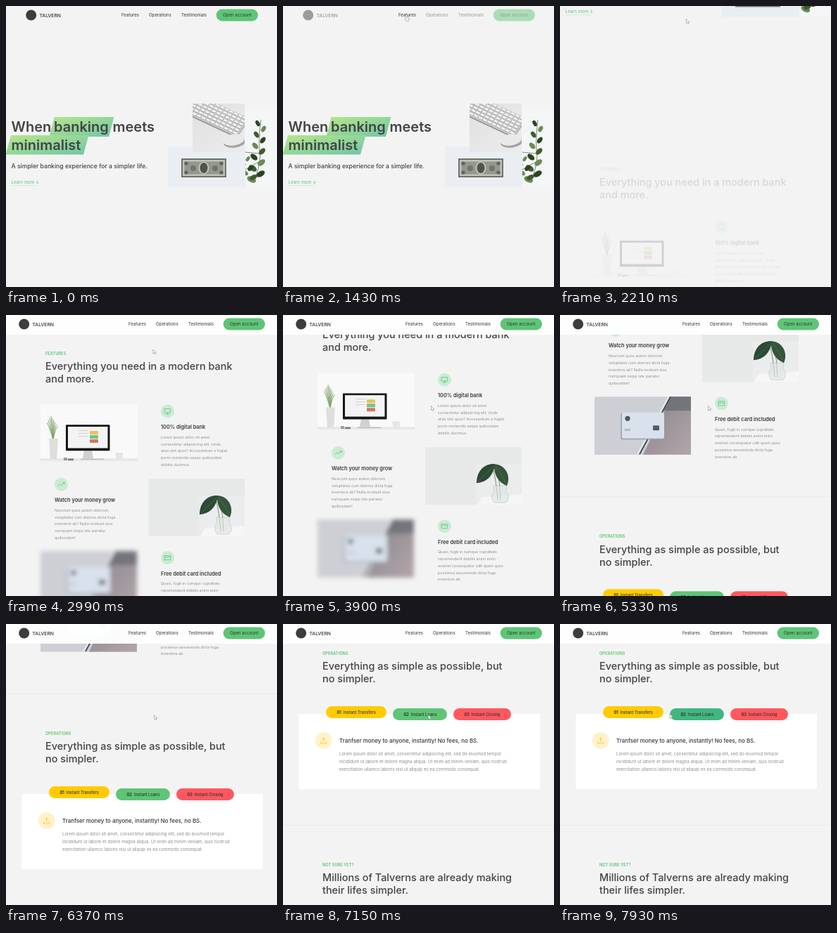
Animation, 385 px wide and 400 px high, one loop 8 s. Source, as an HTML page:

```html
<!DOCTYPE html>
<html lang="en">
<head>
<meta charset="utf-8">
<title>Talvern</title>
<style>
  html, body { margin: 0; width: 100%; height: 100%; overflow: hidden; background: #f3f3f3; }
  svg { display: block; width: 385px; height: 400px; font-family: Inter, "Open Sans", sans-serif; }
  text { white-space: pre; }
  .h1 { font-size: 20px; font-weight: 600; fill: #444; }
  .lead { font-size: 8.65px; font-weight: 500; fill: #444; }
  .link { font-size: 6.1px; fill: #5ec576; }
  .nav { font-size: 6.1px; fill: #333; }
  .brand { font-size: 6.8px; font-weight: 500; fill: #333; }
  .label { font-size: 5.7px; font-weight: 600; fill: #5ec576; }
  .h2 { font-size: 14.45px; font-weight: 500; fill: #444; }
  .h3 { font-size: 7.35px; font-weight: 600; fill: #3a3a3a; }
  .body { font-size: 5.4px; fill: #929292; }
  .tab { font-size: 5.7px; font-weight: 500; fill: #333; }
  .tab tspan { font-weight: 700; }
  .h4 { font-size: 7.9px; font-weight: 500; fill: #333; }
  .copy { font-size: 6.1px; fill: #8c8c8c; }
  .icon { fill: none; stroke-width: .8; stroke-linecap: round; stroke-linejoin: round; }
</style>
</head>
<body>
<svg id="stage" viewBox="0 0 385 400"></svg>
<script>
const LOOP = 8000, STEP = 130;

// Eased progress from 0 to 1 between two times
function ramp(t, from, to) {
  const k = Math.min(1, Math.max(0, (t - from) / (to - from)));
  return k * k * (3 - 2 * k);
}

const scrollAt = t => 400 * ramp(t, 1690, 2600) + 114 * ramp(t, 3510, 4420) +
  228 * ramp(t, 4940, 5760) + 151 * ramp(t, 6180, 6770);

function pointerAt(t) {
  const enter = ramp(t, 130, 910), leave = ramp(t, 2080, 2600),
    down = ramp(t, 2990, 3510), toTab = ramp(t, 7020, 7800);
  return [371 - 197 * enter + 35 * leave + 1.5 * down - 54.5 * toTab,
    100 - 87 * enter + 36 * leave + 80.5 * down - 1.5 * toTab];
}

const text = (cls, x, y, s) => `<text class="${cls}" x="${x}" y="${y}">${s}</text>`;
const lines = (cls, x, y, gap, list) => list.map((s, i) => text(cls, x, y + i * gap, s)).join('');
const repeat = (n, draw) => Array.from({ length: n }, (_, i) => draw(i)).join('');
const rect = (x, y, w, h, fill, extra = '') =>
  `<rect x="${x}" y="${y}" width="${w}" height="${h}" fill="${fill}" ${extra}/>`;
const path = (d, fill, extra = '') => `<path d="${d}" fill="${fill}" ${extra}/>`;
const stroke = (d, color, w = 1) => path(d, 'none', `stroke="${color}" stroke-width="${w}"`);
const circle = (x, y, r, fill) => `<circle cx="${x}" cy="${y}" r="${r}" fill="${fill}"/>`;
const oval = (x, y, rx, ry, turn, fill) =>
  `<ellipse rx="${rx}" ry="${ry}" fill="${fill}" transform="translate(${x} ${y}) rotate(${turn})"/>`;
const group = (id, inner) => `<g id="${id}">${inner}</g>`;
const gradient = (id, a, b) =>
  `<linearGradient id="${id}" x2="1" y2="1"><stop stop-color="${a}"/><stop offset="1" stop-color="${b}"/></linearGradient>`;

const icon = (x, y, r, fill, color, d) => circle(x, y, r, fill) +
  `<path class="icon" d="${d}" stroke="${color}" transform="translate(${x} ${y})"/>`;
const rule = y => rect(0, y, 385, .6, '#e5e5e5');
const heading = (y, label, a, b) =>
  text('label', 56, y + 2, label) + lines('h2', 56, y + 23.3, 18, [a, b]);

function feature(x, y, d, title, copy) {
  return icon(x + 9.5, y, 9.5, '#cbebd3', '#5ec576', d) +
    text('h3', x, y + 25, title) + lines('body', x, y + 38.8, 9.75, copy);
}

function tab(id, x, y, w, fill, no, name) {
  return rect(x, y, w, 17, fill, `rx="8.5" id="${id}"`) +
    text('tab', x + 15.5, y + 10.6, `<tspan>${no}</tspan>  ${name}`);
}

// Hero pictures
function keyboard() {
  const keys = rect(-1, -1, 12.3, 6.5, '#8f8f8f') + rect(-1, -1, 12.2, 6.2, '#c9c9c9') +
    repeat(66, i => rect(i % 11, Math.floor(i / 11) - 1, .84, .78, '#8d8d8d') +
      rect(i % 11, Math.floor(i / 11) - 1, .8, .66, '#f0f0f0'));
  return '<g clip-path="url(#deskClip)">' + rect(265, 139, 74, 69, 'url(#desk)') +
    `<g transform="matrix(6.4 3 -2.8 4.2 271 131)">${keys}</g>` +
    oval(325, 193.5, 16, 8, -8, '#a3a3a3') + oval(323.5, 190.5, 15.5, 8, -8, '#e9e9e9') + '</g>';
}

function bill() {
  return rect(230, 200, 110, 58, '#eaeef2') + rect(249, 217, 64, 27, '#6f726c') +
    rect(251, 219, 60, 23, '#bfc1b8') + rect(253.5, 221.5, 55, 18, '#94978e') +
    repeat(4, i => circle(256 + i % 2 * 50, 224 + (i >> 1) * 13, 2.6, '#5f635b')) +
    oval(281, 230.5, 7.5, 9, 0, '#c3c5bc') + oval(281, 230.5, 5.5, 7.5, 0, '#50544d') +
    repeat(2, i => circle(266 + 31 * i, 231, 4, '#70746b'));
}

function branch() {
  const greens = ['#2c4425', '#6d8a52', '#3f5c30'];
  const spray = (n, x, y, dx, dy, size) => repeat(n, i => {
    const k = i / (n - 1), side = i % 2 ? 1 : -1, r = size + 1.8 * k;
    return oval(x + dx * k + side * (r + .8), y + dy * k, r * .75, r * 1.25, side * (28 + 35 * k), greens[i % 3]);
  });
  return rect(340, 146, 45, 112, '#f3f5f7') +
    stroke('M362 162Q358 196 361 214Q360 232 352 249M360 210L339 208M359 222L334 236', '#77805e', .9) +
    spray(11, 362, 167, -7, 80, 3.6) + spray(6, 338, 211, 8, 33, 2.8);
}

// Feature pictures
function office() {
  const blades = repeat(9, i => `M67 178Q${62 + i} 160 ${58 + i * 2} ${144 + Math.abs(i - 3) * 3}`);
  const bars = repeat(3, i => rect(103, 164 + i * 4, 14, 1, '#d0d0d0') +
    rect(119, 165 + i * 6, 12, 5, ['#e9c25c', '#75c47c', '#d8736c'][i], 'rx="1"'));
  return rect(49, 127, 138, 81, '#f9f9f9') + rect(49, 204, 138, 4, '#e8e8e8') +
    stroke(blades, '#7fa36c', .9) + path('M61 176H74L72 205H63Z', '#dededc') +
    path('M111 193H122L124 204H109Z', '#cfd1d3') + rect(85, 156.3, 62.5, 37, '#161616', 'rx="1"') +
    rect(88, 159, 56.5, 30.5, '#f3f3f3') + bars +
    rect(82, 203, 5, 4, '#9b9b9b') + rect(88, 204.5, 8, 2.5, '#777') + rect(106, 204.5, 33, 1.5, '#bbb') +
    path('M155 196H166V205H157Z', '#e6e6e6');
}

function vase() {
  return rect(202, 233, 137, 82, '#e7e9e9') + rect(274, 257, 65, 58, '#ebeced') +
    path('M282 304L339 300V315H276Z', '#f6f6f6') +
    stroke('M298 262Q303 280 305 308M303 262Q309 284 309 308', '#6d8a63', .9) +
    path('M301 257C287 256 275 266 275 284C289 283 299 274 301 257Z', '#2d4a34') +
    path('M300 257C314 257 325 272 318 288C306 283 299 272 300 257Z', '#35543a') +
    stroke('M277 282Q288 272 299 260M302 260Q311 271 317 285', '#64815e', .5) +
    path('M299 288H318L317 296Q324 304 317 312H300Q293 304 300 296Z', '#dfe5e5', 'opacity=".65" stroke="#a3adac" stroke-width=".6"');
}

function card() {
  return rect(49, 336, 137, 82.5, '#cdcfd4') + path('M158 336H186V418.5H118Z', 'url(#mauve)') +
    path('M156 336H186V356H147Z', '#5b6268', 'opacity=".6"') +
    stroke('M157 336L113 418', '#3a3b3f', 1.6) + stroke('M154 336L110 418', '#eeeeef', 1.5) +
    rect(86.5, 359, 61, 38, '#98a1ad', 'rx="2"') + rect(88, 358.5, 60, 37, '#d9e1ec', 'rx="2"') +
    circle(96, 367, 3.6, '#50565e') + rect(132, 377, 9, 7, '#555c63', 'rx="1"') +
    '<text x="92" y="384.5" font-size="3" fill="#667">DEBIT</text>';
}

const hero = path('M68.5 158H153.5L146 186H61.5Z', 'url(#mark)') + path('M7 184H117.5L110 211.5H-.5Z', 'url(#mark)') +
  text('h1', 7.5, 179, 'When') + text('h1', 68, 179, 'banking') + text('h1', 151.5, 179, 'meets') +
  text('h1', 7.5, 204.5, 'minimalist') +
  text('lead', 7.5, 231, 'A simpler banking experience for a simpler life.') +
  text('link', 7.5, 253, 'Learn more ↓') + rect(7.5, 255.2, 37.5, .5, '#5ec576', 'opacity=".4"') +
  branch() + bill() + keyboard();

const features = heading(55, 'FEATURES', 'Everything you need in a modern bank', 'and more.') +
  office() + vase() + group('card', card()) +
  feature(220, 137, 'M-4 -3.5H4V2H-4ZM0 2V4M-1.8 4H1.8', '100% digital bank',
    ['Lorem ipsum dolor sit amet', 'consectetur adipisicing elit. Unde', 'alias sint quos? Accusantium a fugiat',
      'porro reiciendis saepe quibusdam', 'debitis ducimus.']) +
  feature(69, 241, 'M-4.5 2.5L-1.5 -.5L.5 1.5L4.5 -2.5M2 -2.5H4.5V0', 'Watch your money grow',
    ['Nesciunt quos autem dolorum', 'voluptates cum dolores dicta fuga', 'inventore ab? Nulla incidunt eius',
      'numquam sequi iste pariatur', 'quibusdam!']) +
  feature(220, 345.5, 'M-4.2 -3H4.2V3H-4.2ZM-4.2 -.8H4.2', 'Free debit card included',
    ['Quasi, fugit in cumque cupiditate', 'reprehenderit debitis animi enim', 'eveniet consequatur odit quam quos',
      'possimus assumenda dicta fuga', 'inventore ab.']);

const operations = rule(478) +
  heading(535, 'OPERATIONS', 'Everything as simple as possible, but', 'no simpler.') +
  rect(22.5, 621, 342.5, 107, '#fff', 'rx="2"') +
  tab('tab1', 61, 610, 86, '#ffcb03', '01', 'Instant Transfers') +
  tab('tab2', 156, 613, 77, '#5ec576', '02', 'Instant Loans') +
  tab('tab3', 242, 613, 82, '#ff585f', '03', 'Instant Closing') +
  icon(57.7, 659, 12, '#fff2cb', '#f5c21a', 'M-4 1.5V4H4V1.5M0 1.5V-4M-2.2 -1.8L0 -4L2.2 -1.8') +
  text('h4', 80, 661.5, 'Tranfser money to anyone, instantly! No fees, no BS.') +
  lines('copy', 80, 680, 11, [
    'Lorem ipsum dolor sit amet, consectetur adipisicing elit, sed do eiusmod tempor',
    'incididunt ut labore et dolore magna aliqua. Ut enim ad minim veniam, quis nostrud',
    'exercitation ullamco laboris nisi ut aliquip ex ea commodo consequat.']);

const reviews = rule(779) +
  heading(836, 'NOT SURE YET?', 'Millions of Talverns are already making', 'their lifes simpler.');

const nav = rect(0, 0, 385, 28, '#fff', 'id="bar" opacity=".96"') +
  group('logo', circle(35.7, 13, 7.5, '#3d3d3d') + text('brand', 47.5, 15.5, 'TALVERN')) +
  group('links', text('nav', 164, 15, 'Features') +
    group('others', text('nav', 203, 15, 'Operations') + text('nav', 249, 15, 'Testimonials') +
      rect(298.7, 4.6, 59.3, 16.8, '#5ec576', 'rx="8.4"') + text('nav', 308, 15, 'Open account')));

const outline = 'stroke="#8c8c8c" stroke-width=".6" stroke-linejoin="round"';
const pointer = path('M0 0V6L1.4 4.8L2.4 7L3.4 6.5L2.5 4.4H4.3Z', '#fff', `id="arrow" ${outline}`) +
  path('M1 0Q2 -.6 2.3 .5V3.2L5 4V6L4.3 8.6H1.2L-1 5.2L-.2 4.6L1 5.4Z', '#fff', `id="hand" ${outline}`);

document.getElementById('stage').innerHTML = '<defs>' +
  gradient('mark', '#b6e68b', '#71c6a6') + gradient('desk', '#e0e0e0', '#ececec') +
  gradient('mauve', '#85848a', '#b3a5aa') +
  '<clipPath id="deskClip"><rect x="265" y="139" width="74" height="69"/></clipPath>' +
  '<filter id="soft" x="-15%" y="-20%" width="130%" height="140%"><feGaussianBlur id="blur"/></filter></defs>' +
  rect(0, 0, 385, 400, '#f3f3f3') +
  group('page', hero + `<g transform="translate(0 400)">${group('features', features)}${operations}${group('reviews', reviews)}</g>`) +
  group('nav', nav) + group('pointer', pointer);

const el = id => document.getElementById(id);
const set = (id, attrs) => { for (const k in attrs) el(id).setAttribute(k, attrs[k]); };
const move = (id, x, y) => set(id, { transform: `translate(${x} ${y})` });
const show = (id, on) => set(id, { visibility: on ? 'visible' : 'hidden' });

function reveal(id, k) {
  move(id, 0, 24 * (1 - k));
  set(id, { opacity: k });
}

function draw(now) {
  const t = Math.floor(now % LOOP / STEP) * STEP;
  const y = scrollAt(t), sticky = y >= 372, shift = sticky ? 10 : 0;
  move('page', 0, -y);
  move('nav', 0, sticky ? 0 : -y);
  move('logo', -shift, 0);
  move('links', shift, 0);
  show('bar', sticky);
  const fade = 1 - .53 * (ramp(t, 650, 1170) - ramp(t, 1820, 2080));
  set('logo', { opacity: fade });
  set('others', { opacity: fade });

  reveal('features', ramp(t, 2000, 2860));
  reveal('reviews', ramp(t, 6180, 6760));
  const blur = 3.2 * (1 - ramp(t, 4420, 4810));
  set('blur', { stdDeviation: blur });
  set('card', { filter: blur > 0 ? 'url(#soft)' : 'none' });
  const k = ramp(t, 7540, 7930), mix = (a, b) => Math.round(a + (b - a) * k);
  set('tab2', { fill: `rgb(${mix(94, 66)},${mix(197, 182)},${mix(118, 128)})` });

  const hand = t >= 780 && t < 1950;
  move('pointer', ...pointerAt(t));
  set('pointer', { opacity: t < STEP ? 0 : 1 });
  show('hand', hand);
  show('arrow', !hand);
}

const start = performance.now();
function tick() {
  draw(performance.now() - start);
  requestAnimationFrame(tick);
}
tick();
</script>
</body>
</html>
```
